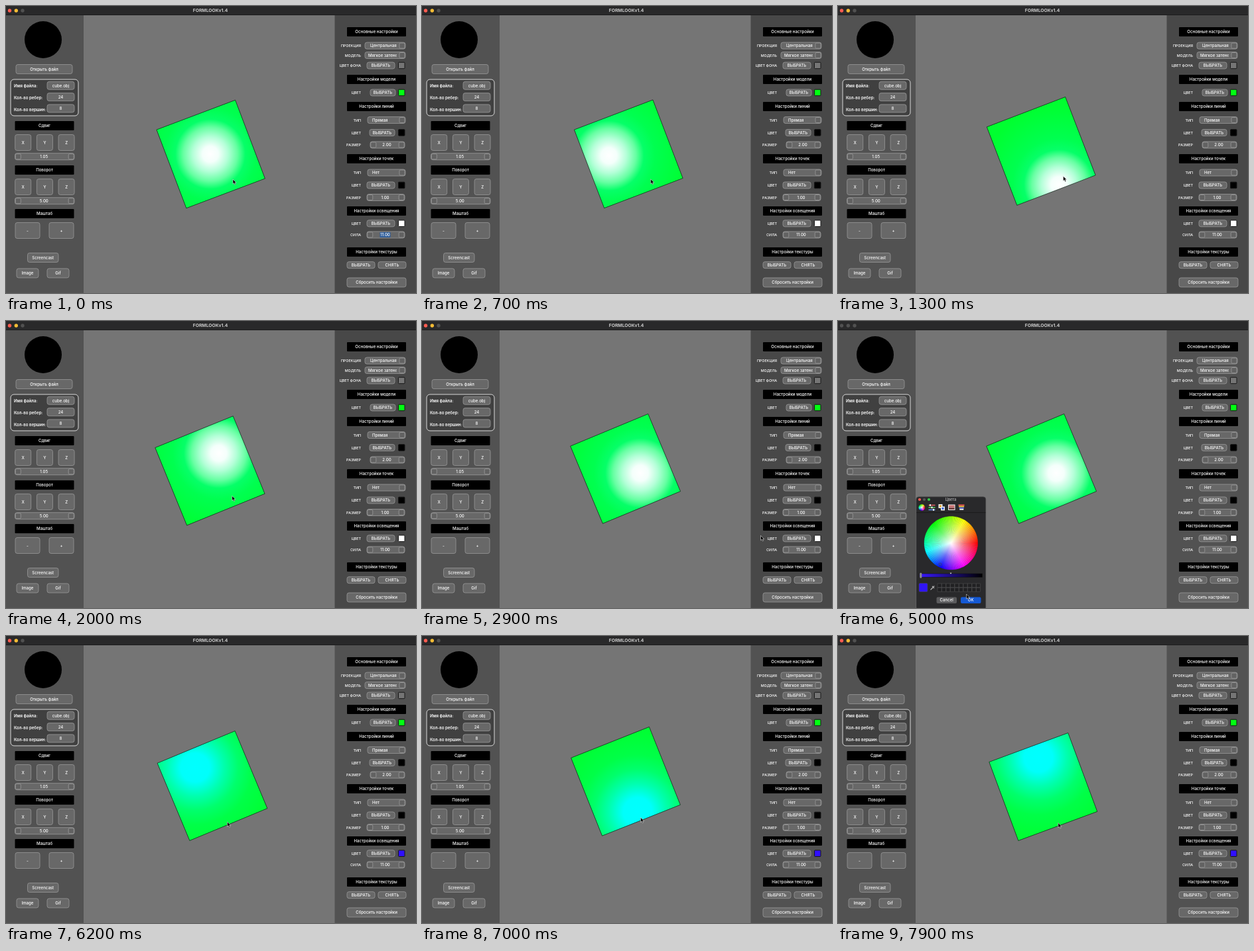
Recreate the animation shown at these times as an HTML page. Size 618x434 px, loop 8000 ms.

```html
<!DOCTYPE html>
<html lang="ru">
<head>
<meta charset="utf-8">
<title>Просмотр модели</title>
<style>
html, body { margin: 0; width: 100%; height: 100%; overflow: hidden; background: #757575; }
svg { display: block; width: 618px; height: 434px; }
text { font: 500 6.1px Inter, "Open Sans", sans-serif; fill: #fff; }
.button { fill: #686868; stroke: #989898; stroke-width: .8; }
.knob { fill: #626262; stroke: #a2a2a2; stroke-width: .7; }
</style>
</head>
<body>
<svg id="stage" viewBox="0 0 618 434" xmlns="http://www.w3.org/2000/svg">
  <defs>
    <radialGradient id="white" gradientUnits="userSpaceOnUse" r="120">
      <stop offset="0" stop-color="#fff"/>
      <stop offset=".1" stop-color="#f4fffb"/>
      <stop offset=".22" stop-color="#b4ffd8"/>
      <stop offset=".34" stop-color="#66ffa2"/>
      <stop offset=".44" stop-color="#06ff68"/>
      <stop offset=".58" stop-color="#00ff50"/>
      <stop offset="1" stop-color="#00ff30"/>
    </radialGradient>
    <radialGradient id="cyan" gradientUnits="userSpaceOnUse" r="120">
      <stop offset="0" stop-color="#0ff"/>
      <stop offset=".18" stop-color="#00fffb"/>
      <stop offset=".36" stop-color="#00ffae"/>
      <stop offset=".54" stop-color="#00ff6c"/>
      <stop offset=".72" stop-color="#00ff48"/>
      <stop offset="1" stop-color="#00ff34"/>
    </radialGradient>
    <radialGradient id="pale">
      <stop offset="0" stop-color="#fff"/>
      <stop offset=".5" stop-color="#fff" stop-opacity=".42"/>
      <stop offset="1" stop-color="#fff" stop-opacity="0"/>
    </radialGradient>
    <linearGradient id="shade">
      <stop id="shadeStart" offset="0"/>
      <stop offset="1" stop-color="#000"/>
    </linearGradient>
    <clipPath id="comboClip"><rect x="541" y="66" width="47.5" height="16"/></clipPath>
  </defs>
  <rect width="618" height="434" fill="#757575"/>
  <polygon id="cube" stroke="#0a1c10" stroke-width=".7"/>
  <g id="panels"></g>
  <g id="dialog"></g>
  <path id="cursor" d="M0 0V7.2L1.7 5.7 2.9 8.3 4.2 7.7 3 5.2H5.2Z" fill="#000" stroke="#ddd" stroke-width=".6"/>
</svg>
<script>
const LOOP = 8000, STEP = 100;
const DESELECT = 300, RELEASE = 2300, OPEN = 3300, PICK = 4600, CLOSE = 5500, GRAB = 5900;
const $ = id => document.getElementById(id);

function add(parent, tag, attrs, content) {
  const el = document.createElementNS("http://www.w3.org/2000/svg", tag);
  for (const key in attrs) el.setAttribute(key, attrs[key]);
  if (content) el.textContent = content;
  return parent.appendChild(el);
}

let layer = $("panels");
const rect = (x, y, width, height, fill, extra) =>
  add(layer, "rect", { x, y, width, height, fill, ...extra });
const dot = (cx, cy, r, fill) => add(layer, "circle", { cx, cy, r, fill });
const label = (x, y, str, anchor = "middle", extra) =>
  add(layer, "text", { x, y: y + 2.2, "text-anchor": anchor, ...extra }, str);

function button(x1, x2, cy, h, str) {
  rect(x1, cy - h / 2, x2 - x1, h, "", { class: "button", rx: 3 });
  label((x1 + x2) / 2, cy, str);
}
function header(x, cy, str) {
  rect(x, cy - 7, 89, 14, "#000", { rx: 1 });
  label(x + 44.5, cy, str);
}
function knob(x, cy) {
  rect(x, cy - 4, 8, 8, "", { class: "knob", rx: 1.5 });
}
function spin(x1, x2, cy, str) {
  button(x1, x2, cy, 10, "");
  knob(x1 + .8, cy);
  knob(x2 - 8.8, cy);
  return label((x1 + x2) / 2 - 1, cy, str);
}
function caption(cy, str) {
  label(535, cy, str, "end", { style: "font-size:5.4px" });
}
function comboRow(cy, name, x, textX, str, extra) {
  caption(cy, name);
  button(x, 602, cy, 10, "");
  label(textX, cy, str, "start", extra);
  knob(593, cy);
}
function colorRow(cy, x, fill, name = "ЦВЕТ") {
  caption(cy, name);
  button(x, x + 38 + (x < 546 ? 4 : 0), cy, 10, "ВЫБРАТЬ");
  return rect(591.5, cy - 4.8, 9.5, 9.5, fill, { stroke: "#161616", rx: 1 });
}
function spinRow(cy, name, x, str) {
  caption(cy, name);
  return spin(x, 601, cy, str);
}

// Window frame
rect(0, 14, 117, 420, "#525252");
const sidebar = rect(495.5, 14, 122.5, 420, "#525252");
rect(0, 0, 618, 14, "#29292a");
rect(0, 13.4, 618, .6, "#161616");
const lights = [5.5, 15.3, 25].map(x => dot(x, 7, 2.7, "#515151"));
label(308, 7, "FORMLOOKv1.4", "middle", { style: "font-size:6.8px;font-weight:700;fill:#c8c8c8" });

// Left panel
dot(56, 51, 28, "#000");
button(15, 100, 95.5, 14, "Открыть файл");
rect(7, 111, 102, 55, "#404040", { rx: 5, stroke: "#d8d8d8" });
[["Имя файла:", "cube.obj"], ["Кол-во ребер:", "24"], ["Кол-во вершин:", "8"]]
  .forEach(([name, value], i) => {
    label(12, 120.5 + i * 18, name, "start", { style: "font-weight:600" });
    button(62, 103, 120.3 + i * 17.3, 12, value);
  });
[["Сдвиг", 181, "1.05"], ["Поворот", 248, "5.00"]].forEach(([name, y, value]) => {
  header(13.5, y, name);
  [..."XYZ"].forEach((axis, i) => button(13.7 + i * 32.7, 37.7 + i * 32.7, y + 25.5, 24, axis));
  spin(13.5, 103, y + 46.7, value);
});
header(13.5, 314, "Маштаб");
button(14, 51, 339.5, 24, "-");
button(65, 102, 339.5, 24, "+");
button(32.5, 79, 380.5, 14, "Screencast");
button(16, 49, 404, 14, "Image");
button(62, 95, 404, 14, "Gif");

// Right panel
header(514, 39, "Основные настройки");
comboRow(60, "ПРОЕКЦИЯ", 541, 549, "Центральная");
comboRow(74.5, "МОДЕЛЬ", 541, 546, "Мягкое затенение", { "clip-path": "url(#comboClip)" });
colorRow(90, 544, "#757575", "ЦВЕТ ФОНА");
header(514, 111, "Настройки модели");
colorRow(131, 549, "#00ff12");
header(514, 152, "Настройки линий");
comboRow(172.5, "ТИП", 545, 552, "Прямая");
colorRow(191.5, 548, "#000");
spinRow(210, "РАЗМЕР", 549, "2.00");
header(514, 231, "Настройки точек");
comboRow(252, "ТИП", 545, 552, "Нет");
colorRow(271, 544, "#000");
spinRow(289.5, "РАЗМЕР", 544, "1.00");
header(514, 310, "Настройки освещения");
const lightSwatch = colorRow(328.8, 544, "#fff");
const power = spinRow(346, "СИЛА", 544, "11.00");
const selection = rect(563.5, 342, 16, 8, "#315f9b");
layer.append(power);
header(514, 372, "Настройки текстуры");
button(514, 556, 391.7, 10, "ВЫБРАТЬ");
button(561, 603, 391.7, 10, "СНЯТЬ");
button(514, 603, 418, 14, "Сбросить настройки");

// Colour dialog
layer = $("dialog");
rect(117.8, 265.8, 105, 171, "#29292b", { rx: 4, stroke: "#555", "stroke-width": .6 });
rect(118, 289.5, 104.5, .6, "#111");
["#ff5b52", "#555", "#35c648"].forEach((c, i) => dot(123 + i * 7, 270, 2.1, c));
label(170, 270, "Цвета", "middle", { style: "font-size:5.6px;fill:#bbb" });

// Hue ring with a wide green sector, fading to white in the middle
function wheel(cx, cy, r, parts) {
  const point = a => `${cx + r * Math.cos(a)},${cy - r * Math.sin(a)}`;
  const slice = 2 * Math.PI / parts;
  for (let i = 0; i < parts; i++) {
    const a = i * slice, hue = a * 180 / Math.PI - 20 * Math.sin(a / 2) ** 6;
    const fill = `hsl(${hue} 100% 50%)`;
    const points = `${cx},${cy} ${point(a - slice / 2)} ${point(a + slice / 2)}`;
    add(layer, "polygon", { points, fill, stroke: fill, "stroke-width": .3 });
  }
  dot(cx, cy, r, "url(#pale)");
}

// Tabs: wheel, sliders, palettes, picture, pencils
wheel(126.3, 282, 4.6, 24);
["#e66", "#6d6", "#69f"].forEach((c, i) => {
  rect(136.5, 277.8 + i * 3.5, 10, 1.4, c);
  rect(138 + i * 2.5, 277.1 + i * 3.5, 2, 2.8, "#eee");
});
["#e8a428", "#3465db"].forEach((c, i) => {
  rect(151.5 + i * 3.5, 277 + i * 3.5, 6, 6, "#eee");
  rect(153 + i * 3.5, 278.5 + i * 3.5, 3, 3, c);
});
rect(166, 277.5, 10.5, 8.5, "#eee");
rect(167, 278.5, 8.5, 4, "#c97575");
rect(167, 282.5, 8.5, 2.5, "#673333");
["#e55", "#eec940", "#4c65df", "#eee"].forEach((c, i) => rect(181.5 + i * .6, 277.5 + i * 2.1, 9 - i, 2, c));

wheel(170.3, 335.8, 40.3, 90);
const marker = add(layer, "circle", { r: 2, fill: "none", stroke: "#444", "stroke-width": .6 });
rect(123, 382, 94.5, 5.5, "url(#shade)", { stroke: "#111", "stroke-width": .6 });
rect(123.3, 380.8, 3, 8, "#8b8b8b", { rx: 1.4 });
add(layer, "path", { d: "M168.5 380.7h3l-1.5 2z", fill: "#ddd" });
const chosen = rect(122, 396.5, 13, 13, "#fff", { rx: 1.5, stroke: "#444", "stroke-width": .6 });
add(layer, "path", { d: "M139.5 406.5L143.5 402.5M142 401L145 404M143.6 402.3L145.3 400.6", stroke: "#bbb", "stroke-width": 1.1 });
for (let i = 0; i < 20; i++)
  rect(150 + i % 10 * 6.5, 397 + Math.floor(i / 10) * 6.4, 6, 5.8, "#202022", { stroke: "#4c4c4e", "stroke-width": .6 });
rect(148.5, 417.5, 30.5, 9.5, "#5b5b5d", { rx: 2 });
label(163.7, 422.2, "Cancel");
rect(185, 417.5, 30.5, 9.5, "#1559d4", { rx: 2 });
label(200.2, 422.2, "OK");

// Time, light centre, tilt of the face in degrees
const rest = [329, 230, 22.4];
const orbit = [
  [0, 308, 224, 24.3], [DESELECT, 308, 224, 24.3], [1000, 262, 228, 24],
  [1300, 333, 270, 24], [1600, 356, 232, 23.5], [1900, 318, 190, 23],
  [RELEASE, ...rest], [GRAB, ...rest],
  [6200, 285, 199, 22.4], [6450, 266, 230, 22.7], [7000, 325, 266, 23.3],
  [7300, 378, 222, 24], [7900, 302, 184, 24.7]
];
// Time and tip of the cursor between the two drags
const trip = [
  [RELEASE, 340, 261], [2900, 510.5, 324.5], [3100, 560, 328], [OPEN, 560, 328],
  [3600, 490, 345], [4400, 154, 368], [PICK, 154, 368], [5000, 193.5, 413],
  [5200, 200, 420], [CLOSE, 200, 420], [GRAB, 329, 278]
];

function sample(keys, t) {
  const i = keys.findIndex(key => key[0] > t);
  if (i < 0) return keys[keys.length - 1].slice(1);
  const a = keys[i - 1], b = keys[i], k = (t - a[0]) / (b[0] - a[0]);
  return a.slice(1).map((v, n) => v + (b[n + 1] - v) * k);
}

// The face and the dragging hand both move a tenth as far as the light, the other way
const follow = (x, y, [lx, ly]) => [x - (lx - 308) / 10, y - (ly - 224) / 10];

function corners([cx, cy], tilt) {
  return [180, 270, 0, 90].map(turn => {
    const a = (turn + tilt) * Math.PI / 180;
    return [cx + 89.7 * Math.cos(a), cy + 89.7 * Math.sin(a)];
  });
}

function cursorAt(t, light) {
  if (t < RELEASE) return follow(342, 262, light);
  if (t < GRAB) return sample(trip, t);
  return follow(331.3, 278.6, light);
}

function draw(t) {
  const light = sample(orbit, t);
  const open = t >= OPEN && t < CLOSE, picked = t >= PICK, blue = t >= CLOSE;
  const glow = blue ? "cyan" : "white";
  $("cube").setAttribute("points", corners(follow(308.7, 224, light), light[2]).join(" "));
  $("cube").setAttribute("fill", `url(#${glow})`);
  $(glow).setAttribute("cx", light[0]);
  $(glow).setAttribute("cy", light[1]);
  $("cursor").setAttribute("transform", `translate(${cursorAt(t, light)})`);
  $("dialog").style.display = open ? "" : "none";
  $("shadeStart").setAttribute("stop-color", picked ? "#3818ff" : "#fff");
  chosen.setAttribute("fill", picked ? "#3015f5" : "#fff");
  marker.setAttribute("cx", picked ? 154 : 170.3);
  marker.setAttribute("cy", picked ? 368 : 335.8);
  lightSwatch.setAttribute("fill", blue ? "#3010ff" : "#fff");
  sidebar.setAttribute("fill", t < OPEN ? "#484848" : "#525252");
  selection.style.display = t < DESELECT ? "" : "none";
  ["#ff5c50", "#f6bd35", "#515151"].forEach((c, i) => lights[i].setAttribute("fill", open ? "#515151" : c));
}

const began = performance.now();
function frame() {
  const t = (performance.now() - began) % LOOP;
  draw(Math.floor(t / STEP) * STEP);
  requestAnimationFrame(frame);
}
frame();
</script>
</body>
</html>
```
